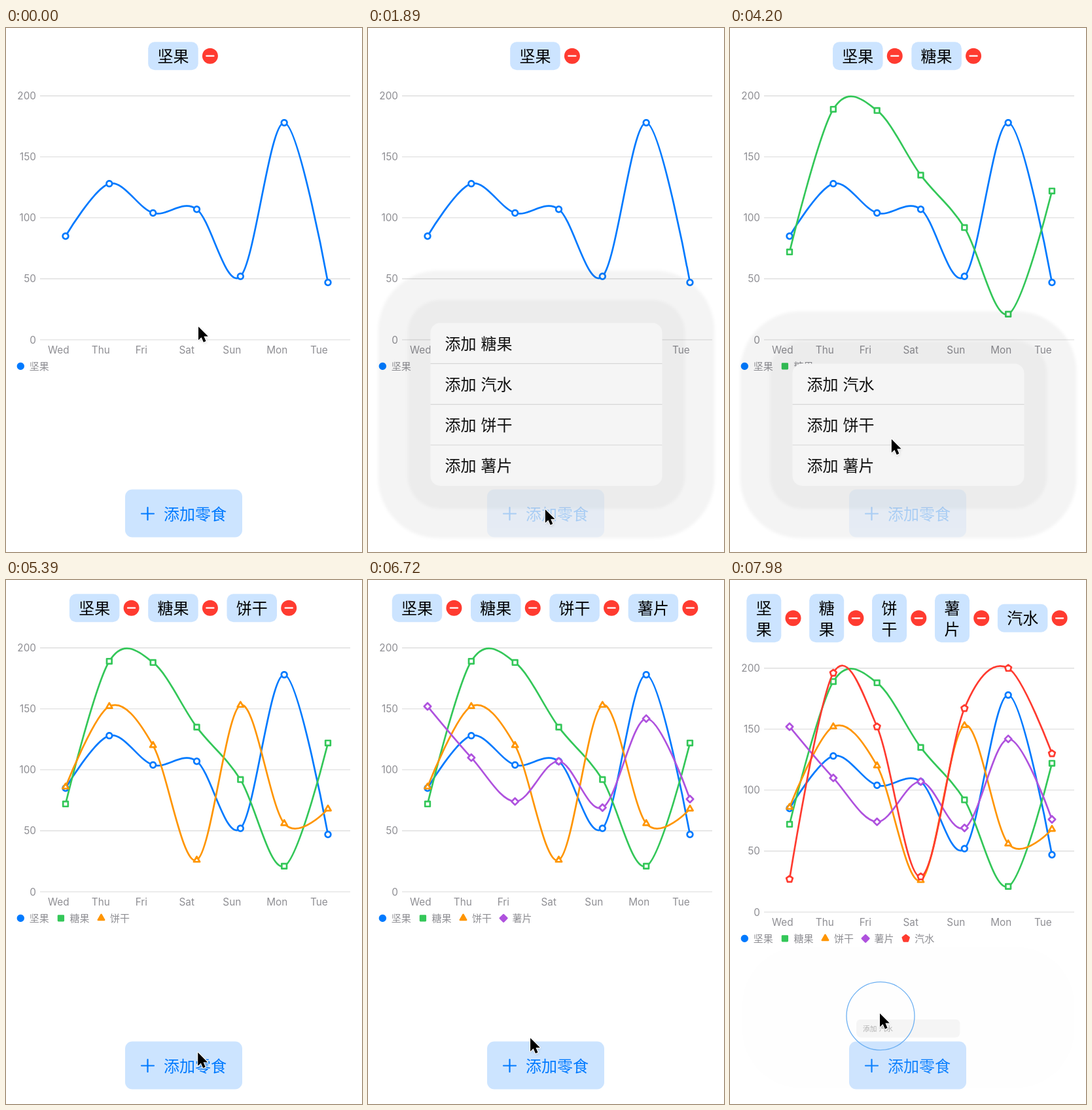
These frames come from a looping animation (544 px wide and 800 px high, 8000 ms). An HTML page:

```html
<!DOCTYPE html>
<html lang="zh-CN">
<head>
<meta charset="utf-8">
<title>零食图表</title>
<style>
html, body { margin: 0; width: 100%; height: 100%; overflow: hidden; background: #fff; }
svg { display: block; width: 100%; height: 100%; }
text { font-family: "Noto Sans CJK SC", "Noto Sans CJK", "Noto Sans", sans-serif; font-size: 24px; white-space: pre; }
.axis { font-family: Inter, Roboto, sans-serif; font-size: 15.3px; fill: #8e8e93; }
.key { font-size: 15px; fill: #8e8e93; }
.mid { text-anchor: middle; }
</style>
</head>
<body>
<svg viewBox="0 0 544 800">
  <defs>
    <filter id="soft" x="-20%" y="-20%" width="140%" height="140%"><feGaussianBlur stdDeviation="2"/></filter>
    <path id="arrow" d="M0 0V20.5L4.6 16.2 7.9 23.7 11.5 22.1 8.4 14.8H14.8Z"/>
  </defs>
  <g id="chips"></g>
  <g id="chart"></g>
  <g id="button">
    <rect x="182" y="704.5" width="179" height="73" rx="11" fill="#cce4ff"/>
    <path d="M207 741.5h19M216.5 732v19" stroke="#007aff" stroke-width="2.2" stroke-linecap="round"/>
    <text x="241" y="750.5" fill="#007aff">添加零食</text>
  </g>
  <g id="shadow" filter="url(#soft)"></g>
  <g id="menu"></g>
  <circle id="ring" r="52" fill="none" stroke="#6db0f2" stroke-width="1.3"/>
  <g id="cursor">
    <use href="#arrow" x="1" y="2" opacity=".18" filter="url(#soft)"/>
    <use href="#arrow" stroke="#fff" stroke-width="2.2" paint-order="stroke" stroke-linejoin="round"/>
  </g>
</svg>
<script>
const LOOP = 8000, STEP = 70, OPEN = 350, CLOSE = 200;
const TRAVEL = 350, REST = 450, HOVER = 250, RING = 300;
const ROW = 62.2, FOOT = 699, BUTTON_Y = 740;
const $ = id => document.getElementById(id);
const clamp = v => Math.max(0, Math.min(1, v));
const smooth = v => v * v * (3 - 2 * v);
const lerp = (a, b, p) => a + (b - a) * p;

const poly = (n, r, turn = 0) => 'M' + Array.from({ length: n }, (_, i) => {
  const a = turn + i * 2 * Math.PI / n;
  return `${(r * Math.sin(a)).toFixed(2)} ${(-r * Math.cos(a)).toFixed(2)}`;
}).join('L') + 'Z';

const series = [
  { name: '坚果', color: '#007aff', shape: poly(40, 4.3), data: [85, 128, 104, 107, 52, 178, 47] },
  { name: '糖果', color: '#34c759', shape: poly(4, 5.4, Math.PI / 4), data: [72, 189, 188, 135, 92, 21, 122] },
  { name: '饼干', color: '#ff9500', shape: poly(3, 5.3), data: [86, 152, 120, 26, 153, 56, 68] },
  { name: '薯片', color: '#af52de', shape: poly(4, 5.2), data: [152, 110, 74, 107, 69, 142, 76] },
  { name: '汽水', color: '#ff3b30', shape: poly(5, 5.1), data: [27, 196, 152, 29, 167, 200, 130] }
];
const days = ['Wed', 'Thu', 'Fri', 'Sat', 'Sun', 'Mon', 'Tue'];
const menuOrder = ['糖果', '汽水', '饼干', '薯片'];

// each session presses the button, then picks the next series from the menu
const sessions = [
  { press: 1400, pick: 2590, buttonX: 271, itemX: 262 },
  { press: 3330, pick: 4620, buttonX: 290, itemX: 236 },
  { press: 5470, pick: 6350, buttonX: 302, itemX: 250 },
  { press: 6900, pick: 7770, buttonX: 246, itemX: 229 }
];

const itemsOf = k => menuOrder.filter(m => series.findIndex(s => s.name === m) > k);
const topOf = items => FOOT - ROW * items.length;

// pointer legs: to the button before each press, to the row before each pick
const legs = sessions.flatMap((s, k) => {
  const items = itemsOf(k);
  const row = items.indexOf(series[k + 1].name);
  return [
    { from: s.press - TRAVEL, to: s.press, x: s.buttonX, y: BUTTON_Y },
    { from: s.press + REST, to: s.pick - HOVER, x: s.itemX, y: topOf(items) + ROW * (row + .4) }
  ];
});

function pointer(t) {
  let x = 294, y = 456;
  for (const leg of legs) {
    const p = smooth(clamp((t - leg.from) / (leg.to - leg.from)));
    x = lerp(x, leg.x, p);
    y = lerp(y, leg.y, p);
  }
  return [x, y];
}

const px = i => 91 + 66.83 * i;
const py = v => 476 - 1.862 * v;

// Catmull-Rom spline with zero tangents at both ends
function curve(data) {
  const pts = data.map((v, i) => [px(i), py(v)]);
  const tangent = i => pts[i - 1] && pts[i + 1]
    ? pts[i + 1].map((v, k) => (v - pts[i - 1][k]) / 6) : [0, 0];
  const shift = (i, sign) => pts[i].map((v, k) => v + sign * tangent(i)[k]);
  return 'M' + pts[0] + pts.slice(1).map((p, i) => `C${shift(i, 1)} ${shift(i + 1, -1)} ${p}`).join('');
}

function chip(name, x, cy, narrow) {
  const w = narrow ? 53 : 76.5, h = narrow ? 74 : 43;
  const mx = x + w / 2, bx = x + w + 18.2;
  const line = (s, y) => `<text class="mid" x="${mx}" y="${y}">${s}</text>`;
  const label = narrow ? line(name[0], cy - 6) + line(name[1], cy + 25.5) : line(name, cy + 9);
  return `<rect x="${x}" y="${cy - h / 2}" width="${w}" height="${h}" rx="10" fill="#cce4ff"/>${label}
    <circle cx="${bx}" cy="${cy}" r="12" fill="#ff3b30"/>
    <path d="M${bx - 5.6} ${cy}h11.2" stroke="#fff" stroke-width="2.2" stroke-linecap="round"/>`;
}

function drawChips(n) {
  const full = n === series.length;
  $('chips').innerHTML = series.slice(0, n).map((s, i) => full
    ? chip(s.name, 25.3 + 95.9 * i, 58.3, i < n - 1)
    : chip(s.name, 217.2 - 60.15 * (n - 1) + 120.3 * i, 42.7, false)).join('');
}

function symbol(s, x, y, fill) {
  return `<path d="${s.shape}" transform="translate(${x} ${y})" fill="${fill}"
    stroke="${s.color}" stroke-width="2.7" stroke-linejoin="round"/>`;
}

function drawChart(n) {
  let out = '';
  for (let v = 0; v <= 200; v += 50) {
    out += `<path d="M52 ${py(v)}H526" stroke="#d9d9d9" stroke-width="1.1"/>
      <text class="axis" x="46" y="${py(v) + 5.5}" text-anchor="end">${v}</text>`;
  }
  days.forEach((d, i) => out += `<text class="axis" x="${64 + 66.83 * i}" y="496.8">${d}</text>`);
  series.slice(0, n).forEach((s, i) => {
    const x = 22.3 + 61.6 * i;
    out += `<path d="${curve(s.data)}" fill="none" stroke="${s.color}" stroke-width="2.7" stroke-linecap="round"/>`
      + s.data.map((v, k) => symbol(s, px(k), py(v), '#fff')).join('')
      + symbol(s, x, 516.3, s.color)
      + `<text class="key" x="${x + 13.5}" y="521.8">${s.name}</text>`;
  });
  $('chart').innerHTML = out;
  $('chart').setAttribute('transform', `translate(0 ${n === series.length ? 31 : 0})`);
}

function drawMenu(k) {
  const items = itemsOf(k), top = topOf(items);
  const box = (grow, r, style) => `<rect x="${95.5 - grow}" y="${top - grow}" width="${354 + 2 * grow}"
    height="${FOOT - top + 2 * grow}" rx="${r}" ${style}/>`;
  $('shadow').innerHTML = box(80, 92, 'opacity=".045"') + box(35, 50, 'opacity=".03"');
  $('menu').innerHTML = box(0, 15, 'fill="#f5f5f5"') + '<g id="rows">' + items.map((m, i) => {
    const y = top + ROW * i;
    return (i ? `<path d="M95.5 ${y}h354" stroke="#d6d6d6" stroke-width="1.1"/>` : '')
      + `<text x="117.5" y="${y + 40.3}" fill="#111" word-spacing="1.6">添加 ${m}</text>`;
  }).join('') + '</g>';
}

const fade = (id, o) => $(id).setAttribute('opacity', o.toFixed(3));
let shownCount = 0, shownMenu = -1;

function render(t) {
  const count = 1 + sessions.filter(s => t >= s.pick + STEP).length;
  if (count !== shownCount) {
    drawChips(count);
    drawChart(count);
    shownCount = count;
  }

  const k = sessions.findIndex(s => t >= s.press + STEP && t < s.pick + STEP + CLOSE);
  let open = 0, panel = 0;
  if (k >= 0) {
    if (k !== shownMenu) drawMenu(shownMenu = k);
    const inP = clamp((t - sessions[k].press - STEP) / OPEN);
    const outP = clamp((t - sessions[k].pick - STEP) / CLOSE);
    const grown = 1 - Math.pow(1 - inP, 3);
    const scale = lerp(.2, 1, grown) * lerp(1, .21, outP);
    open = grown * clamp(1 - 1.3 * outP);
    panel = clamp(inP * 3) * clamp((1 - outP) * 4);
    $('menu').setAttribute('transform', `translate(272 698) scale(${scale.toFixed(4)}) translate(-272 -698)`);
    fade('rows', grown * (1 - outP));
  }
  fade('menu', panel);
  fade('shadow', open);
  fade('button', 1 - .7 * open);

  const [x, y] = pointer(t);
  $('cursor').setAttribute('transform', `translate(${x.toFixed(2)} ${y.toFixed(2)})`);
  const click = sessions.flatMap(s => [s.press, s.pick]).find(c => t >= c && t < c + RING);
  $('ring').setAttribute('cx', x + 1);
  $('ring').setAttribute('cy', y + 4);
  fade('ring', click === undefined ? 0 : clamp((click + RING - t) / 80));
}

const start = performance.now();
function tick() {
  const t = (performance.now() - start) % LOOP;
  render(Math.floor(t / STEP) * STEP);
  requestAnimationFrame(tick);
}
tick();
</script>
</body>
</html>
```
